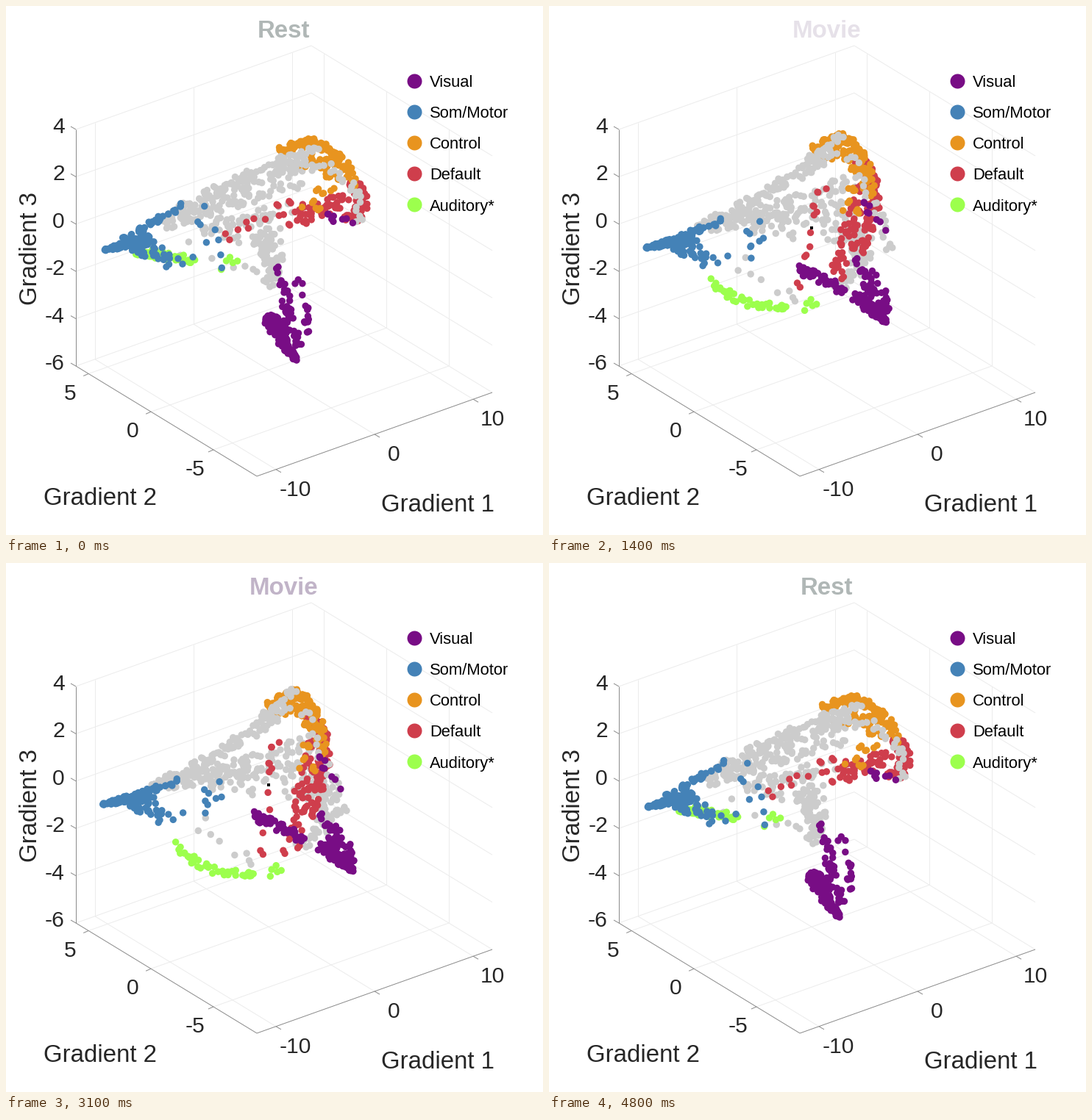
A matplotlib script that plays this animation: 730 px wide and 720 px high, repeating every 4.9 s.

```python
import numpy as np
import matplotlib.pyplot as plt
from matplotlib.animation import FuncAnimation

W, H, DPI = 730, 720, 100
PX = 72 / DPI
FRAMES, INTERVAL = 49, 100
MID = FRAMES // 2
UNIT, LAST = 19, 23  # frames per unit of travel, step where the dots settle

PURPLE, BLUE, ORANGE = "#780d85", "#4482b7", "#e8941f"
RED, GREEN, GRAY = "#cf3e4c", "#9cff4d", "#cccccc"
INK, AXIS, GRID = "#262626", "#8c8c8c", "#ececec"

plt.rcParams["font.family"] = "Liberation Sans"
rng = np.random.default_rng(7)

fig = plt.figure(figsize=(W / DPI, H / DPI), dpi=DPI, facecolor="white")
ax = fig.add_axes([0, 0, 1, 1])
ax.set(xlim=(0, W), ylim=(H, 0))
ax.axis("off")


def line(p, q, color=GRID, z=0):
    ax.plot(*zip(p, q), color=color, lw=PX, zorder=z, solid_capstyle="butt")


def label(x, y, s, size, color=INK, **kw):
    return ax.text(x, y, s, fontsize=size * PX, color=color, va="baseline",
                   rotation_mode="anchor", zorder=20, **kw)


# --- axes box: three edge vectors from the lower left corner ---------------
LEFT = np.array([95, 490])
EX, EY, EZ = np.array([320, -114]), np.array([246, 150]), np.array([0, -322])
FRONT = LEFT + EY

for i in range(6):
    p = LEFT + EZ * i / 5
    line(p, p + EX)
    line(p + EX, p + EX + EY)
    line(p, p + (-7, -4), AXIS, 1)
    label(80, p[1] + 5, str(2 * i - 6), 30, ha="right")

for i in range(3):
    p = LEFT + EX * (.5 + .419 * (i - 1))
    line(p, p + EZ)
    line(p, p + EY)
    line(p + EY, p + EY + (7, 4), AXIS, 1)
    label(*(p + EY + (26, 36)), str(10 * i - 10), 30, ha="center")

    p = LEFT + EY * (.415 + .345 * (i - 1))
    line(p, p + EX)
    line(p + EX, p + EX + EZ)
    line(p, p + (-7, 3), AXIS, 1)
    label(*(p + (-25, 35)), str(5 - 5 * i), 30, ha="center")

for p, q in ((LEFT, LEFT + EZ), (LEFT, FRONT), (FRONT, FRONT + EX)):
    line(p, q, AXIS, 1)

label(587.5, 688, "Gradient 1", 33, ha="center")
label(128, 679, "Gradient 2", 33, ha="center")
label(42, 330, "Gradient 3", 33, ha="center", rotation=90)

# --- legend ---------------------------------------------------------------
KEYS = {"Visual": PURPLE, "Som/Motor": BLUE, "Control": ORANGE,
        "Default": RED, "Auditory*": GREEN}
for i, (name, color) in enumerate(KEYS.items()):
    y = 102 + 42 * i
    ax.scatter(555, y, s=(20 * PX) ** 2, c=color, lw=0, zorder=20)
    label(576, y + 8.5, name, 22, "black")

# --- dots -----------------------------------------------------------------
starts, ends, colors = [], [], []


def along(pts, u):
    """Points at u in 0..1 on the polynomial curve through evenly spaced pts."""
    k = len(pts)
    coef = np.linalg.solve(np.vander(np.linspace(0, 1, k)), np.array(pts, float))
    return np.vander(u, k) @ coef


def band(color, n, w0, w1, a, b):
    """Scatter n dots around curve a; each travels to its place on curve b."""
    u = rng.random(n)
    r = (w0 + (w1 - w0) * u) * np.sqrt(rng.random(n))
    t = 2 * np.pi * rng.random(n)
    off = np.column_stack([r * np.cos(t), r * np.sin(t)])
    starts.append(along(a, u) + off)
    ends.append(along(b, u) + off)
    colors.extend([color] * n)


# unassigned sheet: inner part, lower fold, strays
band(GRAY, 110, 8, 22, [(215, 298), (410, 222)], [(218, 302), (405, 260)])
band(GRAY, 55, 14, 24, [(255, 285), (320, 305), (375, 275)], [(265, 292), (420, 305)])
band(GRAY, 95, 24, 9, [(335, 300), (362, 335), (358, 380)],
     [(400, 295), (450, 330), (402, 388)])
band(GRAY, 8, 14, 14, [(235, 330), (345, 365)], [(266, 355), (335, 420)])

# default: right edge, inner fold, strays
band(RED, 115, 8, 9, [(472, 242), (484, 268), (468, 290)],
     [(400, 198), (427, 255), (403, 350)])
band(RED, 50, 10, 13, [(465, 262), (392, 290)], [(415, 235), (385, 400)])
band(RED, 14, 10, 10, [(300, 315), (410, 260)], [(360, 415), (360, 212)])

# control: inner scatter, arc
band(ORANGE, 50, 14, 14, [(385, 208), (440, 218), (415, 278)],
     [(362, 198), (405, 203), (412, 285)])
band(ORANGE, 105, 8, 7, [(373, 199), (432, 190), (476, 245)],
     [(355, 196), (403, 182), (429, 262)])

# upper edge and right rim of the sheet
band(GRAY, 115, 6, 13, [(222, 287), (320, 236), (422, 203)], [(200, 304), (300, 253), (387, 178)])
band(GRAY, 24, 8, 8, [(405, 215), (462, 235), (478, 288)], [(395, 180), (455, 340)])

# auditory
band(GREEN, 40, 6, 6, [(172, 332), (257, 347)], [(238, 386), (282, 424), (350, 432)])
band(GREEN, 5, 10, 10, [(282, 357), (316, 335)], [(362, 430), (380, 416)])

# somatomotor: wedge, upper edge, lower scatter, strays
band(BLUE, 90, 1, 9, [(134, 332), (195, 317)], [(131, 328), (195, 315)])
band(BLUE, 40, 4, 4, [(160, 318), (240, 272)], [(160, 323), (234, 300)])
band(BLUE, 28, 5, 20, [(170, 328), (242, 348)], [(167, 326), (226, 346)])
band(BLUE, 8, 12, 14, [(265, 270), (285, 350)], [(296, 306), (260, 332)])

# visual: left corner, bulk, arm, strays on the right and on top
band(PURPLE, 45, 7, 7, [(354, 432), (366, 428), (386, 446)], [(334, 333), (412, 370)])
band(PURPLE, 85, 10, 3, [(362, 437), (394, 481)], [(435, 378), (480, 411)])
band(PURPLE, 42, 9, 6, [(370, 362), (398, 468)], [(436, 347), (478, 404)])
band(PURPLE, 14, 18, 5, [(398, 342), (408, 445)], [(448, 342), (477, 402)])
band(PURPLE, 8, 5, 5, [(436, 287), (480, 297)], [(424, 262), (460, 320)])

A, B = np.vstack(starts), np.vstack(ends)
cloud = ax.scatter(*A.T, s=(9.4 * PX) ** 2, c=colors, lw=0, zorder=5)
origin = ax.scatter(356.5, 301.5, s=(5 * PX) ** 2, c="black", marker="s", lw=0, zorder=6)

title = label(378, 43, "Rest", 33, ha="center", weight="bold")
REST, MOVIE = np.array([176, 183, 182]) / 255, np.array([106, 75, 123]) / 255


def update(i):
    k = MID - abs(MID - i)  # out and back
    cloud.set_offsets(A + (B - A) * min(k, LAST) / UNIT)
    origin.set_visible(1 < k < UNIT)
    fade = 1 - 2 * k / MID
    name, color = ("Rest", REST) if fade > 0 else ("Movie", MOVIE)
    title.set_text(name)
    title.set_color(1 - (1 - color) * abs(fade))
    return cloud, origin, title


anim = FuncAnimation(fig, update, frames=FRAMES, interval=INTERVAL,
                     repeat=True, repeat_delay=0, blit=False)
plt.show()
```
